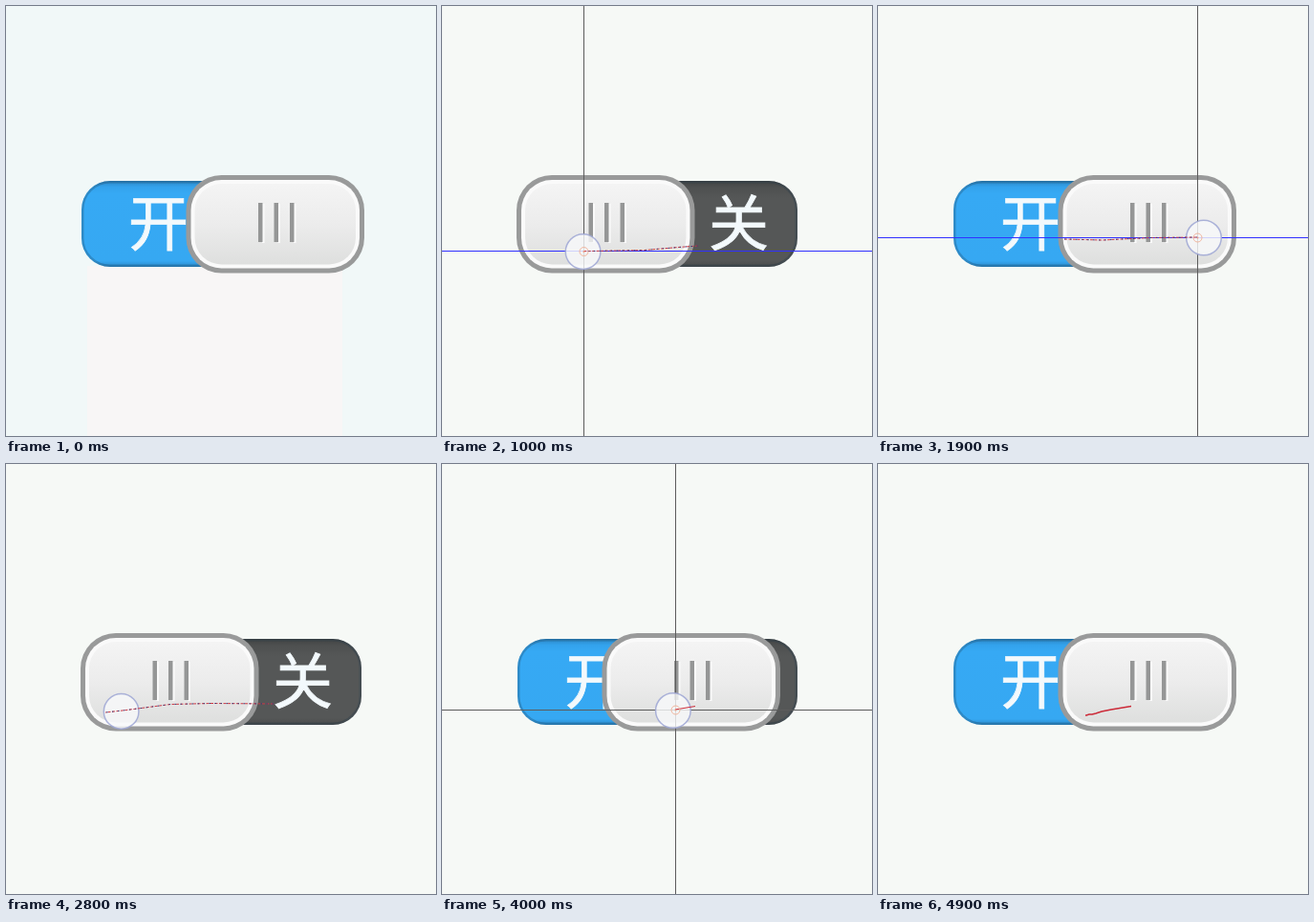
Animation of 450 by 450 pixels, one loop 5000 ms. Source, as an HTML page with a canvas:

```html
<!DOCTYPE html>
<html lang="zh">
<head>
<meta charset="utf-8">
<title>Toggle switch</title>
<style>
  html, body { margin: 0; width: 100%; height: 100%; overflow: hidden; background: #f6f9f6; }
  canvas { position: absolute; inset: 0; width: 100vw; height: 100vh; }
  #switch { filter: blur(.7px); }
</style>
</head>
<body>
<canvas id="switch" width="450" height="450"></canvas>
<canvas id="touch" width="450" height="450"></canvas>
<script>
const art = document.getElementById('switch').getContext('2d');
const ink = document.getElementById('touch').getContext('2d');
const LOOP = 5000, STEP = 100;
const TRAVEL = 110.5, LEFT = 78, LEAD = 0.13;
const BLUE = '#3030ff', GREY = '#5c5c5c';

// Touch points are sampled once per step; `gone` is when the touch ring disappears.
const swipes = [
  { start: 600, gone: 1400, from: 1, to: 0, line: BLUE,
    pts: [[268, 251], [247, 252.5], [212, 255.5], [156, 256.5], [148, 256.5], [140, 256.5]] },
  { start: 1600, gone: 2200, from: 0, to: 1, line: BLUE,
    pts: [[195, 244], [235, 245], [285, 242.5], [334, 242]] },
  { start: 2400, gone: 3000, from: 1, to: 0, line: BLUE, tail: [104, 260],
    pts: [[280, 251], [215, 250.5], [172, 251.5], [126, 257.5]] },
  { start: 3200, gone: 3700, from: 0, to: 1, line: GREY,
    pts: [[168, 260], [225, 262.5], [290, 264.5], [306, 265]] },
  { start: 3900, gone: 4900, from: 1, to: 1, line: GREY, solid: true,
    pts: [[265, 253.5], [244, 257], [234, 259], [228, 261], [224, 262], [221, 262], [218, 263], [217, 263]] }
];

function fillBox(x, y, w, h, r, fill) {
  art.beginPath();
  art.roundRect(x, y, w, h, r);
  art.fillStyle = fill;
  art.fill();
}

function shade(y0, y1, ...stops) {
  const g = art.createLinearGradient(0, y0, 0, y1);
  stops.forEach(([at, color]) => g.addColorStop(at, color));
  return g;
}

function backdrop(t) {
  art.fillStyle = t < 600 ? '#f1f8f8' : '#f6f9f6';
  art.fillRect(0, 0, 450, 450);
  if (t < 600) {
    art.fillStyle = '#f8f6f6';
    art.fillRect(85, 272, 267, 178);
  }
}

function label(text, x) {
  art.font = '63px "Noto Sans CJK SC", "Noto Sans CJK", sans-serif';
  art.textAlign = 'center';
  art.fillStyle = art.strokeStyle = '#f3f9fc';
  art.lineWidth = 0.8;
  art.fillText(text, x, 250);
  art.strokeText(text, x, 250);
}

function track(split) {
  art.save();
  art.beginPath();
  art.roundRect(79, 183, 293, 90, 30);
  art.clip();
  art.fillStyle = shade(183, 273, [0, '#2b86c4'], [0.07, '#33a2ec'], [0.15, '#36a9f4'], [0.93, '#36a8f2'], [1, '#2c8bcb']);
  art.fillRect(79, 183, split - 79, 90);
  art.fillStyle = shade(183, 273, [0, '#424444'], [0.08, '#4e5050'], [0.2, '#555757'], [0.92, '#555757'], [1, '#4a4c4c']);
  art.fillRect(split, 183, 372 - split, 90);
  label('开', 159.5);
  label('关', 310.5);
  art.beginPath();
  art.roundRect(79, 183, 293, 90, 30);
  art.strokeStyle = 'rgba(20,50,70,.25)';
  art.lineWidth = 5;
  art.stroke();
  art.restore();
}

function knob(x) {
  fillBox(x, 177, 186.5, 102.5, 37, '#999a9a');
  fillBox(x + 5, 182, 176.5, 92.5, 32, '#fafafa');
  fillBox(x + 9, 186, 168.5, 84.5, 28, shade(186, 270, [0, '#f4f4f4'], [0.5, '#ececec'], [1, '#dedfde']));
  for (const dx of [75.5, 92, 108.5]) {
    fillBox(x + dx + 4, 207, 2.5, 41, 0, '#fafafa');
    fillBox(x + dx, 206, 4.5, 41, 0, '#959696');
  }
}

function line(points, color, width, dash = []) {
  ink.beginPath();
  points.forEach(([x, y]) => ink.lineTo(x, y));
  ink.strokeStyle = color;
  ink.lineWidth = width;
  ink.setLineDash(dash);
  ink.stroke();
}

function disc(x, y, r, fill, stroke, width) {
  ink.setLineDash([]);
  ink.beginPath();
  ink.arc(x, y, r, 0, Math.PI * 2);
  if (fill) { ink.fillStyle = fill; ink.fill(); }
  if (stroke) { ink.strokeStyle = stroke; ink.lineWidth = width; ink.stroke(); }
}

function pose(swipe, t) {
  if (!swipe) return { pos: 1 };
  const { pts, from, to, start } = swipe;
  const i = Math.round((t - start) / STEP);
  const down = i < pts.length;
  const k = Math.min(i, pts.length - 1);
  const at = pts[k], before = pts[Math.max(k - 1, 0)];
  const dragged = Math.min(1, Math.max(0, from + (at[0] - pts[0][0]) / TRAVEL));
  const settle = down ? 0 : Math.min(1, (i - pts.length + 1) / 3);
  return {
    pos: dragged + (to - dragged) * (1 - (1 - settle) ** 2),
    at, down,
    trail: pts.slice(0, k + 1).concat(!down && swipe.tail ? [swipe.tail] : []),
    ring: at.map((v, n) => v + (v - before[n]) * LEAD + 0.6)
  };
}

function touch(swipe, p, t) {
  if (p.down) {
    const [x, y] = p.at.map(v => Math.floor(v) + 0.5);
    line([[0, y], [450, y]], swipe.line, 1);
    line([[x, 0], [x, 450]], GREY, 1);
  }
  if (t < swipe.gone) {
    ink.globalAlpha = t >= swipe.gone - STEP && !swipe.tail ? 0.5 : 1;
    disc(...p.ring, 18.3, 'rgba(248,249,251,.8)', 'rgba(158,166,212,.85)', 1.5);
    ink.globalAlpha = 1;
  }
  if (swipe.solid) {
    line(p.trail, '#cc2a38', p.down ? 1 : 1.5);
  } else {
    line(p.trail, '#cc3a46', 1, [3, 1.5]);
    line(p.trail, '#3a3a78', 1, [1.5, 4.5]);
  }
  if (p.down) {
    const [x, y] = p.at;
    disc(x + 0.5, y + 0.5, 4.5, null, '#f0b49c', 1);
    disc(x + 0.5, y + 0.5, 1, '#ee9c80');
  }
}

function draw(t) {
  const swipe = swipes.filter(s => s.start <= t).pop();
  const p = pose(swipe, t);
  const x = LEFT + TRAVEL * p.pos;
  backdrop(t);
  track(x + 93);
  knob(x);
  ink.clearRect(0, 0, 450, 450);
  if (swipe) touch(swipe, p, t);
}

function tick() {
  const t = performance.now() % LOOP;
  draw(Math.floor(t / STEP) * STEP);
  requestAnimationFrame(tick);
}
tick();
</script>
</body>
</html>
```
